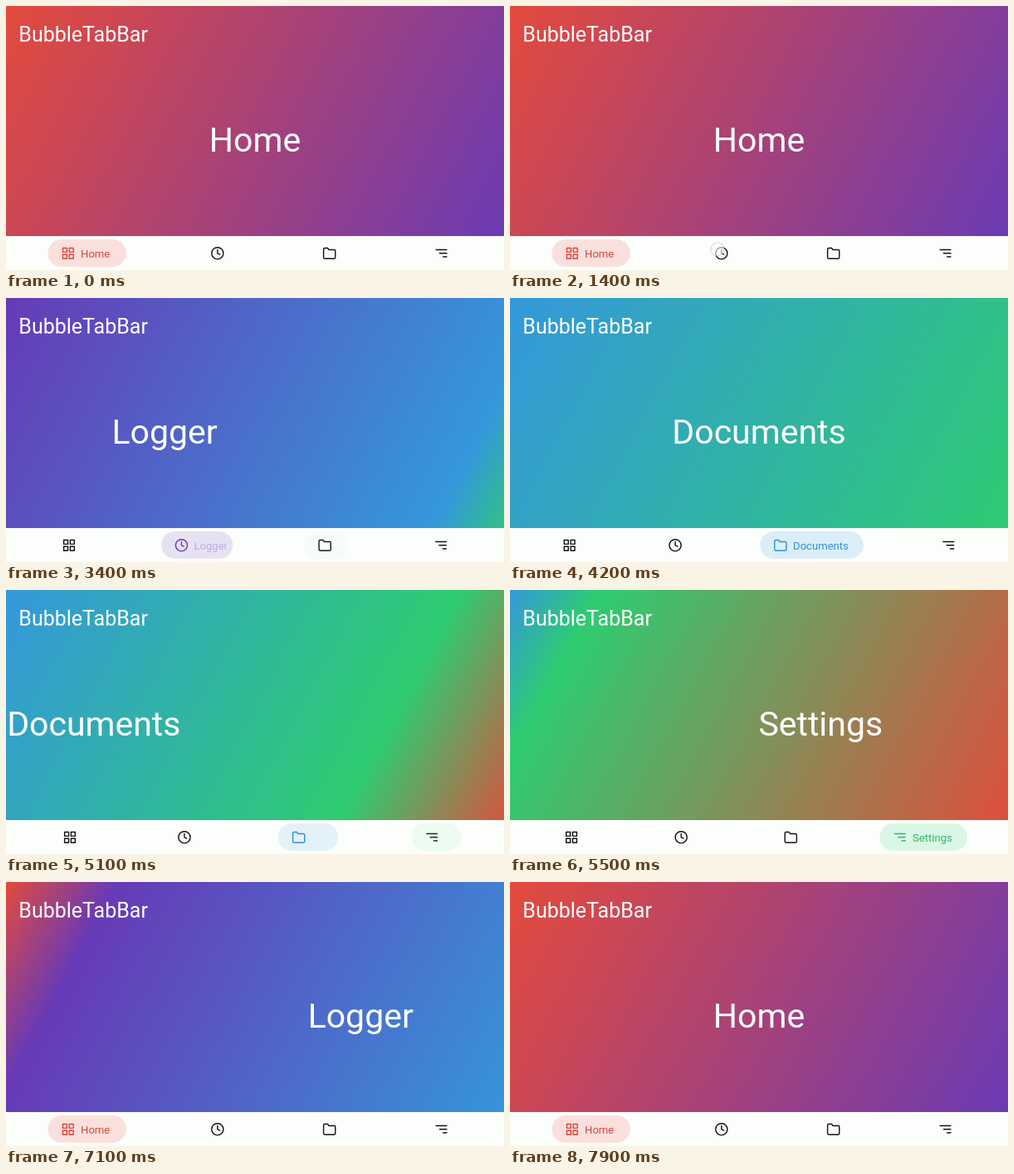
Recreate the animation shown at these times as an HTML page with a canvas. Size 600 by 319 pixels, loop 8000 ms.

```html
<!DOCTYPE html>
<html lang="en">
<head>
<meta charset="utf-8">
<title>BubbleTabBar</title>
<style>
html, body { margin: 0; width: 100%; height: 100%; overflow: hidden; background: #fcfefb; }
canvas { display: block; }
</style>
</head>
<body>
<canvas id="stage" width="600" height="319"></canvas>
<script>
const ctx = document.getElementById('stage').getContext('2d');
const W = 600, H = 319, BAR_Y = 278, MID_Y = 298.5;
const LOOP = 8000;
const SETTLE = 850;           // decelerating scroll across one page
const SEEK = SETTLE * 0.3356; // constant-speed scroll across one page
const EXPAND = 550, COLLAPSE = 240;
const FONT = 'Roboto, Arial, sans-serif';
const INK = [18, 18, 18];
const RED = [228, 74, 60], PURPLE = [103, 58, 183], BLUE = [52, 152, 219], GREEN = [46, 204, 113];
const COLORS = [RED, PURPLE, BLUE, GREEN, RED, PURPLE];

const TABS = [
  { name: 'Home', width: 94.5, tint: RED, ink: [218, 68, 58], icon: gridIcon },
  { name: 'Logger', width: 99, tint: PURPLE, ink: PURPLE, icon: clockIcon },
  { name: 'Documents', width: 124.5, tint: BLUE, ink: [48, 146, 212], icon: folderIcon },
  { name: 'Settings', width: 105.5, tint: GREEN, ink: [44, 184, 106], icon: linesIcon }
];
const SMALL = 50;

const TAPS = [
  { at: 1680, from: 0, to: 1, x: 250 },
  { at: 3320, from: 1, to: 2, x: 387 },
  { at: 4950, from: 2, to: 3, x: 523 },
  { at: 6435, from: 3, to: 0, x: 71 }
];

const clamp = v => Math.max(0, Math.min(1, v));
const ease = u => 0.5 - 0.5 * Math.cos(Math.PI * clamp(u));
const mix = (a, b, k) => a.map((v, i) => v + (b[i] - v) * k);
const rgb = (c, a = 1) => `rgba(${c.map(Math.round).join(',')},${a})`;

function lastTap(t) {
  return TAPS.filter(tap => tap.at <= t).pop();
}

function pagePosition(t) {
  const tap = lastTap(t);
  if (!tap) return 0;
  const pages = Math.abs(tap.to - tap.from);
  const dt = t - tap.at, seekTime = (pages - 1) * SEEK;
  const u = clamp((dt - seekTime) / SETTLE);
  const moved = dt < seekTime ? dt / SEEK : pages - (1 - u) ** 2;
  return tap.from + Math.sign(tap.to - tap.from) * moved;
}

// open: width, fill: bubble opacity, tone: icon colour, label: text opacity
function tabState(i, t) {
  const tap = lastTap(t);
  const on = { open: 1, fill: 1, tone: 1, label: 1 };
  const off = { open: 0, fill: 0, tone: 0, label: 0 };
  if (!tap) return i === 0 ? on : off;
  const dt = t - tap.at;
  if (i === tap.to) {
    const e = ease(dt / EXPAND);
    return { open: e, fill: clamp(e * 2.5), tone: e, label: clamp((e - 0.5) * 2) };
  }
  if (i === tap.from) {
    const u = clamp(dt / EXPAND);
    return {
      open: 1 - ease(dt / COLLAPSE), fill: 1 - u,
      tone: 1 - u ** 3, label: 1 - clamp(dt / 120)
    };
  }
  return off;
}

function gridIcon() {
  for (const x of [3, 14]) for (const y of [3, 14]) ctx.rect(x, y, 7, 7);
}

function clockIcon() {
  ctx.arc(12, 12, 10, 0, Math.PI * 2);
  polyline(12, 6, 12, 12, 16, 14);
}

function folderIcon() {
  ctx.moveTo(22, 19);
  ctx.arcTo(22, 21, 20, 21, 2);
  ctx.arcTo(2, 21, 2, 19, 2);
  ctx.arcTo(2, 3, 4, 3, 2);
  ctx.lineTo(9, 3);
  ctx.lineTo(11, 6);
  ctx.arcTo(22, 6, 22, 8, 2);
  ctx.closePath();
}

function linesIcon() {
  polyline(3, 6, 21, 6);
  polyline(9, 12, 21, 12);
  polyline(15, 18, 21, 18);
}

function polyline(x, y, ...rest) {
  ctx.moveTo(x, y);
  for (let i = 0; i < rest.length; i += 2) ctx.lineTo(rest[i], rest[i + 1]);
}

function drawIcon(icon, cx, color) {
  const k = 17 / 24;
  ctx.save();
  ctx.translate(cx, MID_Y + 0.3);
  ctx.scale(k, k);
  ctx.translate(-12, -12);
  ctx.strokeStyle = color;
  ctx.lineWidth = 2;
  ctx.lineCap = ctx.lineJoin = 'round';
  ctx.beginPath();
  icon();
  ctx.stroke();
  ctx.restore();
}

function text(str, x, y, size, color, align) {
  ctx.font = `${size}px ${FONT}`;
  ctx.textAlign = align;
  ctx.fillStyle = color;
  ctx.fillText(str, x, y);
}

function drawPages(t) {
  const shade = pagePosition(t - 18); // the backdrop trails the scroll slightly
  const i = Math.floor(shade), part = shade - i;
  const g = ctx.createLinearGradient(0, 0, W, H);
  g.addColorStop(0, rgb(COLORS[i]));
  g.addColorStop(1 - part, rgb(COLORS[i + 1]));
  if (part > 0) g.addColorStop(1, rgb(COLORS[i + 2]));
  ctx.fillStyle = g;
  ctx.fillRect(0, 0, W, BAR_Y);

  const pos = pagePosition(t);
  TABS.forEach((tab, n) => text(tab.name, W / 2 + (n - pos) * W, 176, 41, '#fff', 'center'));
  text('BubbleTabBar', 15.3, 43, 25, '#fff', 'left');
}

function drawBar(t) {
  ctx.fillStyle = '#fcfefb';
  ctx.fillRect(0, BAR_Y, W, H - BAR_Y);

  const states = TABS.map((tab, i) => tabState(i, t));
  const widths = TABS.map((tab, i) => SMALL + (tab.width - SMALL) * states[i].open);
  const gap = (584 - widths.reduce((a, b) => a + b)) / TABS.length;
  let x = 8;
  TABS.forEach((tab, i) => {
    const s = states[i], w = widths[i], left = x + gap / 2;
    if (s.fill > 0) {
      ctx.fillStyle = rgb(tab.tint, 0.165 * s.fill);
      ctx.beginPath();
      ctx.roundRect(left, 282, w, 33, 16.5);
      ctx.fill();
    }
    drawIcon(tab.icon, left + 25 - 0.6 * s.open, rgb(mix(INK, tab.ink, s.tone)));
    if (s.label > 0) {
      ctx.save();
      ctx.beginPath();
      ctx.rect(left, BAR_Y, w - 8, H - BAR_Y);
      ctx.clip();
      text(tab.name, left + 39.6, 303.8, 13.1, rgb(tab.ink, s.label), 'left');
      ctx.restore();
    }
    x += w + gap;
  });
}

function drawTouch(t) {
  for (const tap of TAPS) {
    const dt = t - tap.at + 340;
    if (dt < 0 || dt > 340) continue;
    ctx.globalAlpha = clamp(dt / 50) * clamp((340 - dt) / 80);
    ctx.beginPath();
    ctx.arc(tap.x, 294, 8, 0, Math.PI * 2);
    ctx.fillStyle = 'rgba(255,255,255,0.6)';
    ctx.fill();
    ctx.strokeStyle = 'rgba(190,175,190,0.4)';
    ctx.lineWidth = 1.5;
    ctx.stroke();
    ctx.globalAlpha = 1;
  }
}

const start = performance.now();
function frame() {
  const t = (performance.now() - start) % LOOP;
  drawPages(t);
  drawBar(t);
  drawTouch(t);
  requestAnimationFrame(frame);
}
frame();
</script>
</body>
</html>
```
